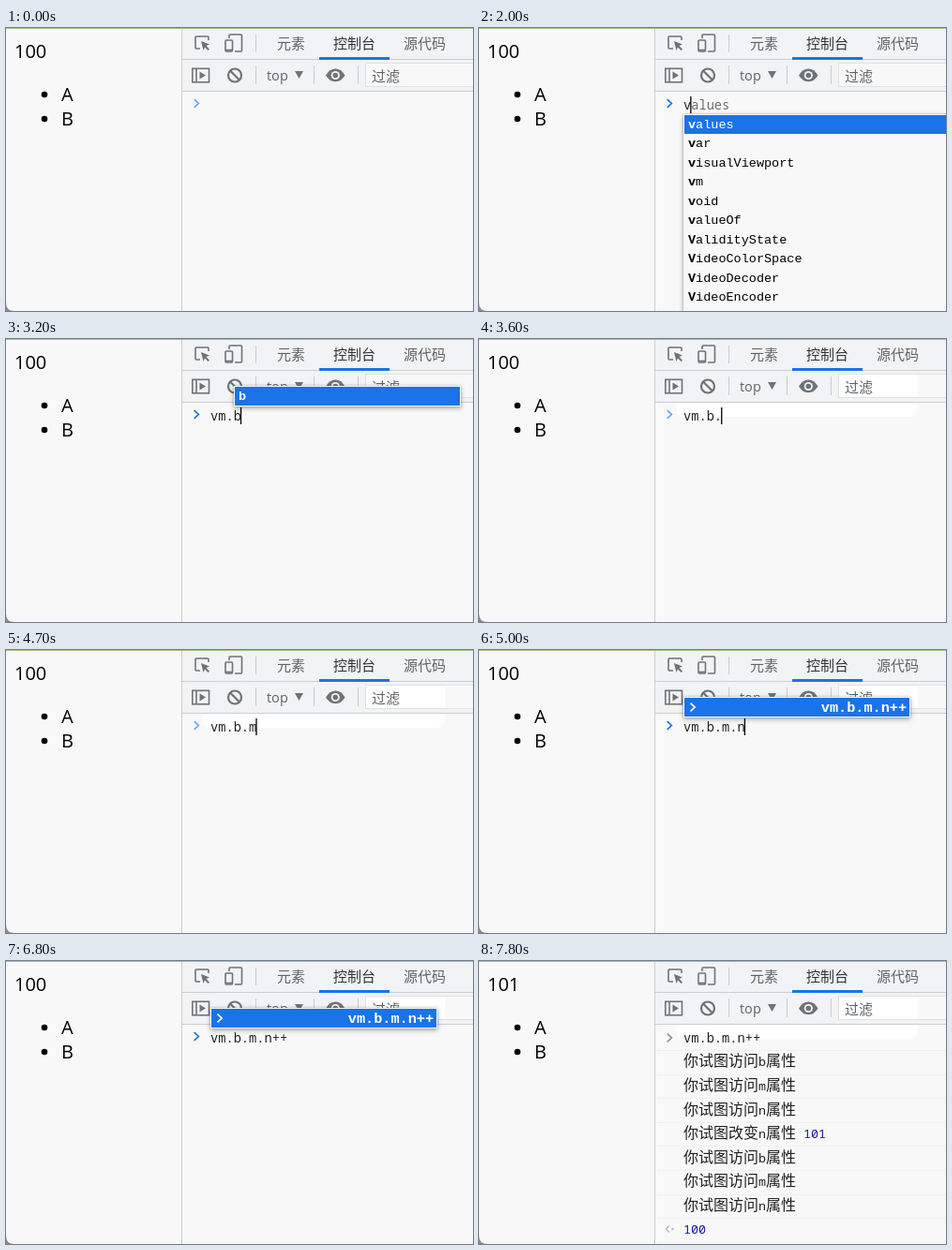
Animation, 498 px wide and 302 px high, one loop 9.8 s. Source, as an HTML page:

```html
<!DOCTYPE html>
<html lang="zh">
<head>
<meta charset="utf-8">
<title>Console typing</title>
<style>
  html, body { margin: 0; width: 100%; height: 100%; overflow: hidden; background: #f8f8f8; }
  svg { display: block; width: 498px; height: 302px; }
  text { white-space: pre; }
  .page { font: 20px "Open Sans", sans-serif; }
  .ui { font: 15px "Noto Sans CJK SC", "Noto Sans CJK", sans-serif; fill: #5f6368; }
  .code { font: 13.7px "Noto Sans Mono", monospace; fill: #202124; }
  .list { font: 13.5px "Liberation Mono", monospace; }
  .bold { font-weight: bold; }
  .past { font-size: 15.2px; }
  .log { font: 300 16px "Noto Sans CJK SC", "Noto Sans CJK", sans-serif; fill: #202124; }
  .mono { font: 13.33px "Noto Sans Mono", monospace; }
  .num { fill: #1a1aa6; }
  .icon { fill: none; stroke: #6e7378; stroke-width: 1.6; }
  .solid { fill: #6e7378; stroke: none; }
  .rule { fill: #cacdd1; }
  .chevron { fill: none; stroke-width: 1.7; }
  .popup { filter: drop-shadow(0 0 1px rgba(0, 0, 0, .25)) drop-shadow(0 2px 2.5px rgba(0, 0, 0, .3)); }
</style>
</head>
<body>
<svg id="stage" viewBox="0 0 498 302">
  <rect width="498" height="302" fill="#f8f8f8"/>
  <path d="M0 293 Q0 302 9 302 H0Z" fill="#8c8c8c"/>

  <g class="page">
    <text id="count" x="9" y="32">100</text>
    <circle cx="41" cy="71" r="3.3"/><text x="59" y="78">A</text>
    <circle cx="41" cy="97" r="3.3"/><text x="59" y="104">B</text>
  </g>

  <rect x="188" width="310" height="67" fill="#f1f3f4"/>
  <g class="rule">
    <rect x="187" width="1" height="302"/>
    <rect x="188" y="33" width="310" height="1"/>
    <rect x="188" y="67" width="310" height="1"/>
    <rect x="266" y="7" width="1" height="19"/>
    <rect x="266" y="40" width="1" height="20"/>
    <rect x="328" y="40" width="1" height="20"/>
    <rect x="375" y="40" width="1" height="20"/>
  </g>
  <rect width="498" height="1" fill="#9fc583"/>

  <g class="icon">
    <path d="M207 22 H203 Q202 22 202 21 V10 Q202 9 203 9 H215 Q216 9 216 10 V13"/>
    <path class="solid" d="M208 14 L217 17.5 L213.5 19 L217 22.7 L215.5 24 L212 20.5 L210.5 24Z"/>
    <path d="M238 11 V8 Q238 7 239 7 H250.5 Q251.5 7 251.5 8 V24 Q251.5 25 250.5 25 H244"/>
    <rect x="234" y="13" width="7.5" height="12" rx="1"/>
    <path d="M234 23.5 H241.5"/>
    <rect x="198.8" y="43.3" width="17.7" height="14.5"/>
    <path d="M203 43.5 V57.5"/>
    <path class="solid" d="M206.5 46.5 L213 50.5 L206.5 54.5Z"/>
    <circle cx="244" cy="50.5" r="7" stroke-width="2.2"/>
    <path d="M239 45.5 L249 55.5" stroke-width="2.2"/>
    <path class="solid" d="M308 46 H317 L312.5 54Z"/>
    <path class="solid" d="M341 50.5 Q345 43.5 351.3 43.5 Q357.5 43.5 361.5 50.5 Q357.5 57.3 351.3 57.3 Q345 57.3 341 50.5Z"/>
    <circle cx="351.3" cy="50.5" r="4.6" fill="#f1f3f4" stroke="none"/>
    <circle class="solid" cx="351.3" cy="50.5" r="2.8"/>
  </g>

  <rect x="383.5" y="37.5" width="120" height="25" fill="#f8f8f8" stroke="#dfe1e4"/>
  <rect id="field" x="384" y="38" width="84" height="24" fill="#fff"/>
  <g class="ui">
    <text x="289" y="22">元素</text>
    <text x="349" y="22" fill="#303236">控制台</text>
    <text x="424" y="22">源代码</text>
    <text x="278" y="56" style="font:14.5px 'Open Sans',sans-serif">top</text>
    <text x="390" y="57">过滤</text>
  </g>
  <rect x="334" y="31" width="75" height="3" fill="#1a73e8"/>

  <path id="patch" d="M210 68 H468 V73 Q468 83 458 83 H219 Q210 83 210 75Z" fill="#fff"/>
  <path id="prompt" class="chevron"/>
  <text class="code" x="218" y="87"><tspan id="typed"></tspan><tspan id="ghost" fill="#6b6f74"></tspan></text>
  <rect id="caret" y="73" width="1.3" height="18"/>
  <g id="logs"></g>
  <g id="popups"></g>
</svg>

<script>
const LOOP = 9800, CHAR = 8.22, ROW = 20.5, BLUE = '#1a73e8';
const $ = id => document.getElementById(id);

function add(parent, tag, attrs = {}, text = '') {
  const node = document.createElementNS('http://www.w3.org/2000/svg', tag);
  for (const key in attrs) node.setAttribute(key, attrs[key]);
  node.textContent = text;
  parent.append(node);
  return node;
}
const show = (node, on) => node.style.display = on ? '' : 'none';
const chevron = (x, y) => `M${x} ${y - 4.3} l4.6 4.3 l-4.6 4.3`;

const HISTORY = '> vm.b.m.n++';

// A completion list; the first "match" letters of each plain row are bold.
function makePopup({ x, y, w, rows, match = 0, selected = 0, scroll = false }) {
  const g = add($('popups'), 'g', { class: 'popup' });
  const h = Math.ceil(rows.length * ROW) + 1;
  add(g, 'rect', { x, y, width: w, height: h, fill: '#f8f8f8' });
  rows.forEach((word, i) => {
    const top = y + 1 + i * ROW, on = i === selected, fill = on ? '#fff' : '#000';
    if (on) add(g, 'rect', { x: x + 1, y: top, width: w - 2, height: 20, fill: BLUE });
    if (word === HISTORY) {
      add(g, 'path', { d: chevron(x + 7.5, top + 10), class: 'chevron', stroke: fill });
      add(g, 'text', { x: x + w - 4, y: top + 15, class: 'list bold past', 'text-anchor': 'end', fill }, word.slice(2));
      return;
    }
    const line = add(g, 'text', { x: x + 5, y: top + 13.5, class: 'list', fill });
    add(line, 'tspan', { class: 'bold' }, word.slice(0, match));
    add(line, 'tspan', {}, word.slice(match));
  });
  if (scroll) {
    add(g, 'rect', { x: x + w - 15, y, width: 15, height: h, fill: '#f1f1f1' });
    add(g, 'path', { d: `M${x + w - 11} ${y + 11} l4 -4 l4 4z`, fill: '#777' });
    add(g, 'rect', { x: x + w - 13, y: y + 17, width: 11, height: 90, fill: '#c4c4c4' });
  }
  return g;
}

const popups = {
  v: makePopup({ x: 218, y: 92, w: 290, match: 1, rows: [
    'values', 'var', 'visualViewport', 'vm', 'void', 'valueOf', 'ValidityState',
    'VideoColorSpace', 'VideoDecoder', 'VideoEncoder', 'VideoFrame'] }),
  vm: makePopup({ x: 218, y: 92, w: 242, match: 2, rows: ['vm', HISTORY] }),
  members: makePopup({ x: 243, y: 92, w: 230, selected: -1, scroll: true, rows: [
    'b', 'arr', 'constructor', 'hasOwnProperty', 'isPrototypeOf', 'propertyIsEnumerable',
    'toLocaleString', 'toString', 'valueOf', '__defineGetter__', '__defineSetter__'] }),
  b: makePopup({ x: 243, y: 50, w: 242, match: 1, rows: ['b'] }),
  both: makePopup({ x: 218, y: 30, w: 242, match: 1, rows: ['b', HISTORY] }),
  past: makePopup({ x: 218, y: 50, w: 242, rows: [HISTORY] })
};

// Console output
const rowY = i => 81.8 + i * 25.6;
const addRule = i => add($('logs'), 'rect', { x: 188, y: Math.round(rowY(i) - 12.5), width: 310, height: 1, fill: '#f0f0f0' });
const visit = name => ['你试图访问', name];
const lines = [visit('b'), visit('m'), visit('n'), ['你试图改变', 'n', ' 101'], visit('b'), visit('m'), visit('n')];
lines.forEach(([verb, name, value = ''], i) => {
  addRule(i + 1);
  const line = add($('logs'), 'text', { x: 218, y: Math.round(rowY(i + 1) + 5), class: 'log' });
  add(line, 'tspan', {}, verb);
  add(line, 'tspan', { class: 'mono' }, name);
  add(line, 'tspan', {}, '属性');
  add(line, 'tspan', { class: 'mono num' }, value);
});
addRule(lines.length + 1);
add($('logs'), 'path', { d: 'M203 282.5 l-3.5 3.5 l3.5 3.5', class: 'chevron', stroke: '#b5b8bc', style: 'stroke-width:1.3' });
add($('logs'), 'circle', { cx: 206.5, cy: 286, r: 1.2, fill: '#b5b8bc' });
add($('logs'), 'text', { x: 218, y: 291, class: 'mono num' }, '100');

// [start, typed text, caret shown, popup]
const steps = [
  [0, '', 0], [1400, '', 1],
  [1900, 'v', 1], [2000, 'v', 1, 'v'], [2200, 'vm', 1, 'vm'],
  [2400, 'vm.', 1], [2500, 'vm.', 1, 'members'], [3000, 'vm.', 0, 'members'],
  [3200, 'vm.b', 1, 'b'], [3300, 'vm.b', 1, 'both'],
  [3600, 'vm.b.', 1], [3700, 'vm.b.', 1, 'past'], [4200, 'vm.b.', 0, 'past'],
  [4700, 'vm.b.m', 1], [4800, 'vm.b.m.', 1, 'past'],
  [4900, 'vm.b.m.n', 1], [5000, 'vm.b.m.n', 1, 'past'], [5500, 'vm.b.m.n', 0, 'past'],
  [6000, 'vm.b.m.n+', 1], [6100, 'vm.b.m.n+', 1, 'past'],
  [6200, 'vm.b.m.n++', 1], [6300, 'vm.b.m.n++', 1, 'past'], [6800, 'vm.b.m.n++', 0, 'past'],
  [7000, 'vm.b.m.n++', 0], [7300, 'vm.b.m.n++', 1], [7800, 'vm.b.m.n++', 0]
];

function render([start, typed, caret, popup]) {
  const done = start >= 7800, late = start >= 3600;
  $('count').textContent = done ? '101' : '100';
  $('typed').textContent = typed;
  $('ghost').textContent = popup === 'v' ? 'alues' : '';
  $('caret').setAttribute('x', 217 + typed.length * CHAR);
  show($('caret'), caret);
  $('prompt').setAttribute('d', chevron(200.7, done ? 82 : 80.5));
  $('prompt').setAttribute('stroke', done ? '#8d9196' : popup || start >= 7000 ? BLUE : '#6ea6f5');
  show($('field'), late);
  show($('patch'), late && !popup);
  show($('logs'), done);
  for (const key in popups) show(popups[key], key === popup);
}

const origin = performance.now();
let current;
function tick() {
  const t = (performance.now() - origin) % LOOP;
  const step = steps.findLast(s => s[0] <= t) || steps[0];
  if (step !== current) render(current = step);
  requestAnimationFrame(tick);
}
tick();
</script>
</body>
</html>
```
